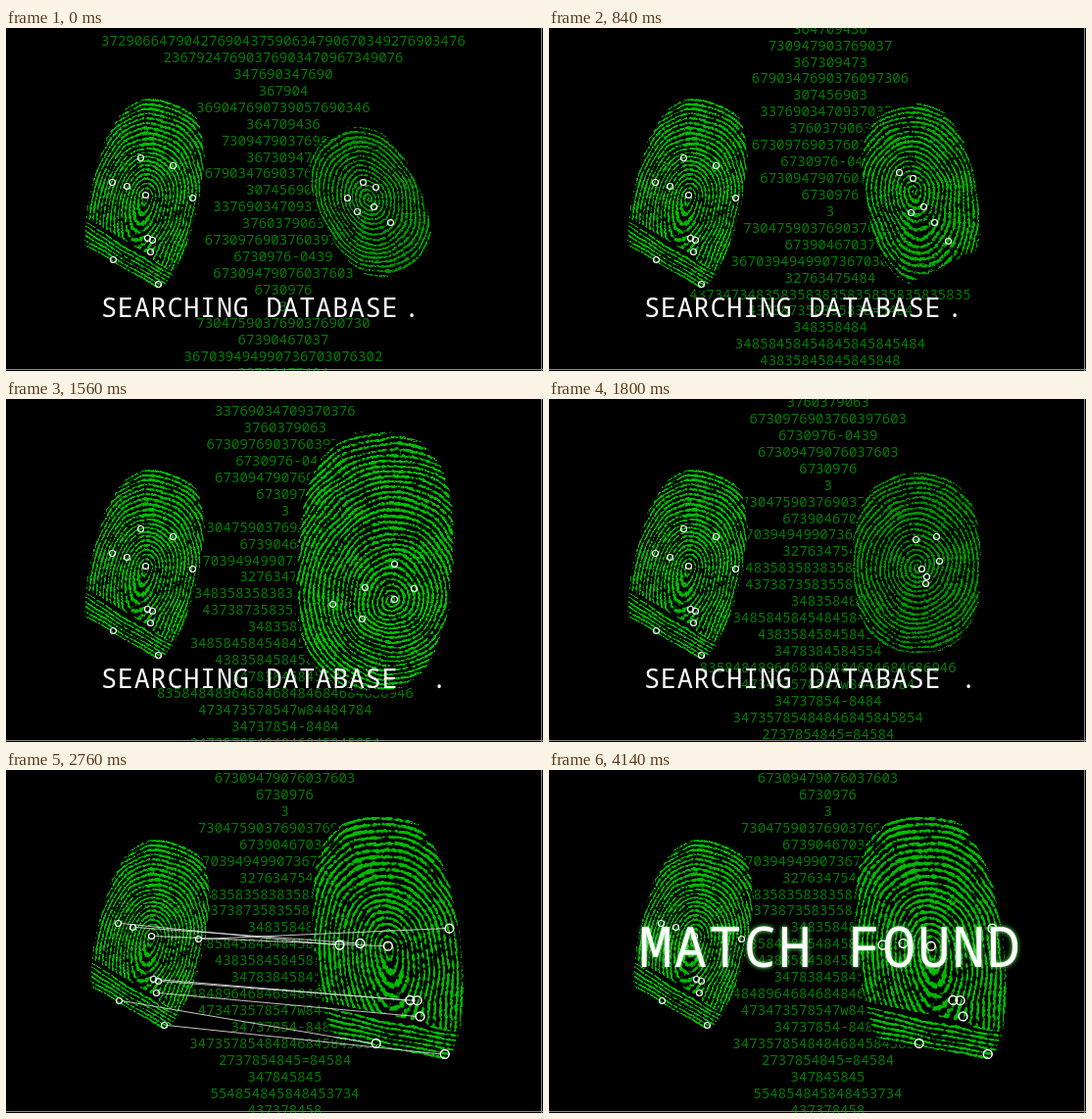
Write an HTML page with a canvas that moves like this. It is 548 by 350 pixels and loops after 4.62 s.

```html
<!DOCTYPE html>
<html>
<head>
<meta charset="utf-8">
<style>
html, body { margin: 0; width: 548px; height: 350px; overflow: hidden; background: #000; }
canvas { display: block; }
</style>
</head>
<body>
<canvas id="stage" width="548" height="350"></canvas>
<pre id="rows" hidden>
37290664790427690437590634790670349276903476
23679247690376903470967349076
347690347690
367904
369047690739057690346
364709436
730947903769037
367309473
6790347690376097306
307456903
33769034709370376
3760379063
6730976903760397603
6730976-0439
67309479076037603
6730976
3
730475903769037690730
67390467037
367039494990736703076302
32763475484
4373473483583583835835835835835835
437387358355838=5484
348358484
34858458454845845845484
43835845845845848
3478384584554
8358484896468468484684684686946
473473578547w84484784
34737854-8484
34735785484846845845854
2737854845=84584
347845845
554854845848453734
437378458
</pre>
<script>
const W = 548, H = 350, LOOP = 4620, FINAL = 27, TAU = Math.PI * 2;
const ctx = document.getElementById('stage').getContext('2d');
const FONT = '"Noto Sans Mono", monospace';
const rows = document.getElementById('rows').textContent.trim().split('\n');

// Each print is a tilted superellipse with ridges winding around a core
const suspect = {
  center: [141, 172], radii: [56, 104], tilt: .22, core: [142, 172], up: .75, down: .4,
  period: 3.6, turns: 0, green: 185, base: [78, 222, .6], crease: true,
  marks: [[108,157],[123,161],[142,170],[190,173],[144,214],[149,216],[147,228],[109,236],[155,261],
    [137,132],[170,140]]
};
const candidates = [
  { center: [371, 177], radii: [53, 80], tilt: -.45, core: [370, 174], up: .75, down: .75,
    period: 3.8, turns: 1, green: 150,
    marks: [[364,157],[377,162],[348,173],[375,182],[358,187],[392,198]] },
  { center: [376, 165], radii: [81, 136], tilt: .06, core: [393, 205], up: .8, down: 1,
    period: 4.6, turns: 1, green: 190,
    marks: [[396,168],[366,192],[416,193],[396,204],[333,209],[363,224]] },
  { center: [375, 167], radii: [67, 94], tilt: 0, core: [376, 170], up: .85, down: .85,
    period: 4.4, turns: 2, green: 145,
    marks: [[374,143],[395,140],[398,165],[380,173],[385,181],[384,188]] },
  { center: [379, 170], radii: [58, 95], tilt: -.18, core: [372, 165], up: .85, down: .55,
    period: 4.2, turns: 1, green: 175, base: [365, 263, -.5],
    marks: [[357,147],[371,153],[382,182],[369,188],[393,198],[407,217]] }
];

const clamp = v => Math.max(0, Math.min(1, v));
const mix = (a, b, k) => a + (b - a) * k;

function hash(x, y) {
  const v = Math.sin(x * 127.1 + y * 311.7) * 43758.5453;
  return v - Math.floor(v);
}

function noise(x, y) {
  const i = Math.floor(x), j = Math.floor(y), u = x - i, v = y - j;
  return mix(mix(hash(i, j), hash(i + 1, j), u), mix(hash(i, j + 1), hash(i + 1, j + 1), u), v);
}

function toAxes(p, [cx, cy], x, y) {
  const c = Math.cos(p.tilt), s = Math.sin(p.tilt);
  return [(x - cx) * c + (y - cy) * s, (y - cy) * c - (x - cx) * s];
}

// Positive inside the print, falling to zero at its rim
function depth(p, x, y) {
  const [u, v] = toAxes(p, p.center, x, y);
  const oval = 1 - Math.abs(u / p.radii[0]) ** 2.6 - Math.abs(v / p.radii[1]) ** 2.6;
  if (!p.base) return oval;
  const [bx, by, slope] = p.base;
  return Math.min(oval, (by + slope * (x - bx) - y) / 25);
}

function ridge(p, x, y) {
  const fold = y - 193 - .6 * (x - 78);
  if (p.crease && x < 150 && Math.abs(fold) < 2.2) return -3;
  const [u, v] = toAxes(p, p.core, x, y);
  const r = p.crease && fold > 0 ? fold * .8 : Math.hypot(u, v * (v < 0 ? p.up : p.down));
  return Math.sin(TAU * r / p.period + p.turns * Math.atan2(v, u) + 6 * noise(x / 20, y / 20));
}

function renderPrint(p, pose = new DOMMatrix()) {
  const canvas = document.createElement('canvas');
  canvas.width = W;
  canvas.height = H;
  const g = canvas.getContext('2d'), image = g.createImageData(W, H), back = pose.inverse();
  for (let i = 0; i < W * H; i++) {
    const { x, y } = back.transformPoint({ x: i % W, y: Math.floor(i / W) });
    const inner = depth(p, x, y);
    if (inner < 0) continue;
    const fine = noise(x / 1.5, y / 1.5), patch = noise(x / 13 + 40, y / 13);
    const level = clamp(1.2 * (ridge(p, x, y) + .15 + 2.2 * (fine - .5) + .9 * (patch - .5)));
    image.data[i * 4 + 1] = inner > .14 * fine ? p.green * level : 0;
    image.data[i * 4 + 3] = 255;
  }
  g.putImageData(image, 0, 0);
  return canvas;
}

// The matching print is the suspect's, turned and enlarged
const pose = new DOMMatrix().translate(340, 178).rotate(-19.6).scale(1.355).translate(-108, -157);
const shared = suspect.marks.slice(0, 9);
const matched = shared.map(([x, y]) => {
  const m = pose.transformPoint({ x, y });
  return [m.x, m.y];
});
const moved = shared.map(([x, y]) => [x + 6, y - 1]);
const suspectImage = renderPrint(suspect);
const matchImage = renderPrint(suspect, pose);
candidates.forEach(c => c.image = renderPrint(c));

// Time, centre and upward travel of the scrolling digits
const scrollKeys = [[0, 283, 0], [360, 285.5, 40], [840, 287, 97], [1200, 285, 131], [2460, 284.5, 268]];
function scrollAt(t) {
  const k = scrollKeys.findIndex(key => key[0] > t), a = scrollKeys[k - 1], b = scrollKeys[k];
  const part = (t - a[0]) / (b[0] - a[0]);
  return [mix(a[1], b[1], part), mix(a[2], b[2], part)];
}

function write(text, x, y, size, spacing, color, align = 'left') {
  ctx.font = `300 ${size}px ${FONT}`;
  ctx.letterSpacing = spacing + 'px';
  ctx.textAlign = align;
  ctx.fillStyle = color;
  ctx.fillText(text, x, y);
}

function drawMarks(marks, radius, width) {
  ctx.strokeStyle = '#fff';
  ctx.lineWidth = width;
  for (const [x, y] of marks) {
    ctx.beginPath();
    ctx.arc(x + .5, y + .5, radius, 0, TAU);
    ctx.stroke();
  }
}

function drawRows([x, travel]) {
  rows.forEach((row, i) => {
    const y = 18 + i * 16.93 - travel;
    if (y > -4 && y < H + 12) write(row, x, y, 14, .05, '#007d00', 'center');
  });
}

function drawSearch(step, t) {
  const c = candidates[Math.floor(step / 3) % 4];
  drawRows(scrollAt(t));
  ctx.drawImage(suspectImage, 0, 0);
  ctx.drawImage(c.image, 0, 0);
  drawMarks(suspect.marks, 3, 1.2);
  drawMarks(c.marks, 3, 1.2);
  write('SEARCHING DATABASE', 97, 295, 27, .65, '#fff');
  // The dot swings between three places, once per round of candidates
  const place = Math.round(1.05 - 1.05 * Math.cos(TAU * (step + .6) / 12.6 % TAU));
  write('.', 406 + 14 * (step % 12 > 6 ? Math.max(0, Math.min(1, 9 - step % 12)) : Math.min(2, place)), 295, 27, 0, '#fff');
}

function drawMatch(t) {
  const fade = start => t < start ? 0 : t < start + 60 ? .5 : 1;
  drawRows([284.5, 242]);
  ctx.drawImage(suspectImage, 6, -1);
  ctx.drawImage(matchImage, 0, 0);

  ctx.globalAlpha = fade(2700) - fade(3000);
  ctx.strokeStyle = '#ddd';
  ctx.lineWidth = .9;
  ctx.beginPath();
  moved.forEach(([x, y], i) => {
    ctx.moveTo(x + 3, y + .5);
    ctx.lineTo(matched[i][0] - 4, matched[i][1] + .5);
  });
  ctx.stroke();
  ctx.globalAlpha = 1;
  drawMarks(moved, 3, 1.2);
  drawMarks(matched, 4.4, 1.5);

  ctx.globalAlpha = fade(3000) - fade(3540) + fade(4080);
  ctx.shadowColor = '#6f6';
  ctx.shadowBlur = 5;
  write('MATCH FOUND', 92, 201, 56, 1.9, '#fff');
  ctx.shadowBlur = 0;
  ctx.globalAlpha = 1;
}

function draw() {
  const t = Math.floor(performance.now() % LOOP / 60) * 60;
  const step = Math.floor(t / 90);
  ctx.fillStyle = '#000';
  ctx.fillRect(0, 0, W, H);
  if (step < FINAL) drawSearch(step, Math.ceil(step * 1.5) * 60);
  else drawMatch(t);
  ctx.fillStyle = '#888';
  ctx.fillRect(546, 0, 1, H);
  ctx.fillRect(0, 348, W, 1);
  requestAnimationFrame(draw);
}
draw();
</script>
</body>
</html>
```
